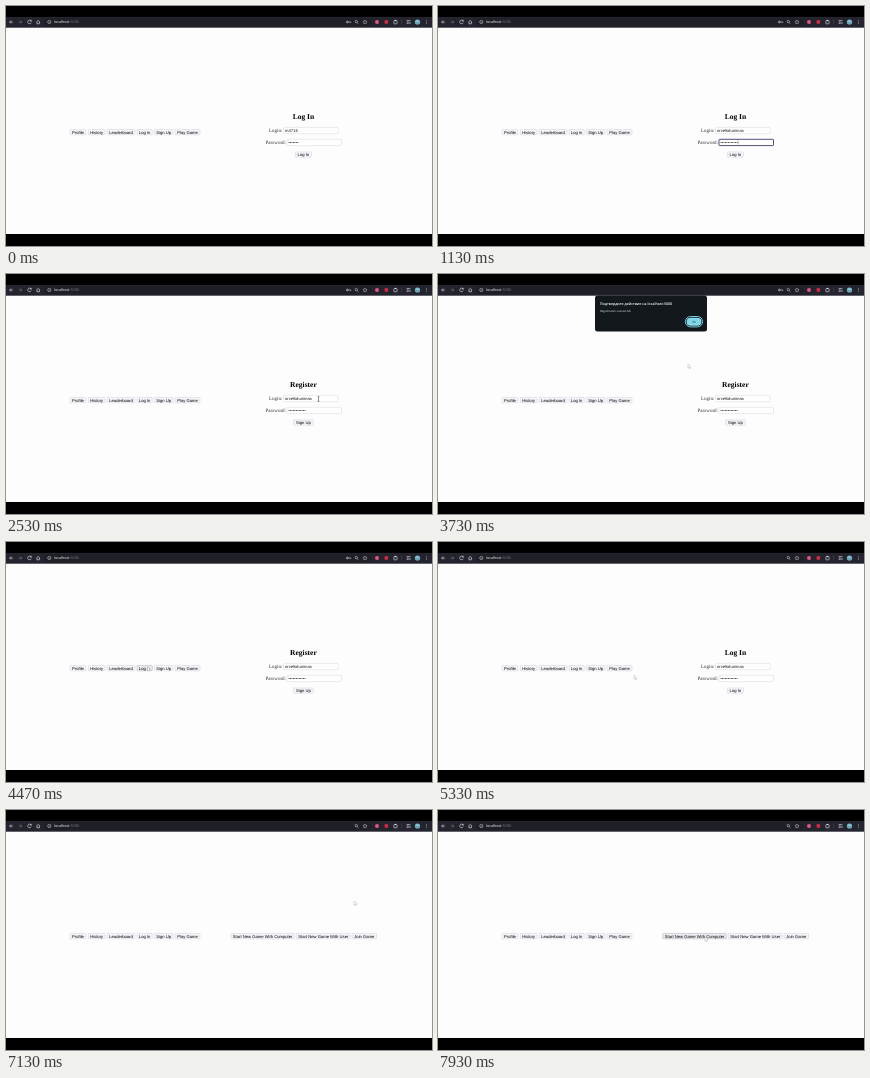
Animation, 426 px wide and 240 px high, one loop 8000 ms. Source, as an HTML page:

```html
<!DOCTYPE html>
<html lang="en">
<head>
<meta charset="utf-8">
<title>Sign-up walkthrough</title>
<style>
html, body { margin: 0; width: 100%; height: 100%; overflow: hidden; background: #000; }
svg { display: block; width: 100vw; height: 100vh; text-rendering: geometricPrecision; }
.ui { font-family: "Liberation Sans", Arial, sans-serif; }
.page { font-family: "Liberation Serif", "Times New Roman", serif; }
.chrome { font-family: "Open Sans", "Noto Sans", sans-serif; }
</style>
</head>
<body>
<svg id="stage" viewBox="0 0 426 240"></svg>
<script>
const LOOP = 8000;
const stage = document.getElementById('stage');
const SHORT_NAME = 'm4716';
const NAME = 'orvelkdunimas';

// Scene changes, in ms
const T = {
  clear: 170, nameStart: 220, nameEnd: 760, passStart: 820, passEnd: 1100,
  register: 1830, alertOn: 3330, alertOff: 4130,
  login: 4580, game: 5600, popupOn: 5730, popupOff: 7130
};

// Pointer stops: time, x, y
const STOPS = [
  [0, 304, 137], [1250, 304, 137], [1780, 158, 127], [1950, 158, 127],
  [2450, 312.5, 125], [2750, 312.5, 125], [3150, 298, 149], [3480, 298, 149],
  [3730, 250, 91], [4000, 256, 48], [4160, 256, 48], [4500, 139, 127],
  [4650, 139, 127], [4930, 298, 149], [5070, 298, 149], [5330, 196, 134],
  [5500, 188, 127], [6650, 188, 127], [7000, 348, 92], [7180, 348, 92],
  [7700, 267, 128], [8000, 267, 128]
];

const NAV = [['Profile', 64, 80], ['History', 82.3, 99], ['Leaderboard', 101, 129],
  ['Log In', 131, 146.3], ['Sign Up', 148.3, 167], ['Play Game', 169, 194]];
const GAME = [['Start New Game With Computer', 224.8, 288.4],
  ['Start New Game With User', 290.3, 344.3], ['Join Game', 346.2, 370.5]];

const clamp = v => Math.max(0, Math.min(1, v));
const within = (t, a, b) => t >= a && t < b;
const progress = (t, a, b) => clamp((t - a) / (b - a));

const rect = (x, y, w, h, fill, extra = '') =>
  `<rect x="${x}" y="${y}" width="${w}" height="${h}" fill="${fill}" ${extra}/>`;
const circle = (x, y, r, fill, extra = '') =>
  `<circle cx="${x}" cy="${y}" r="${r}" fill="${fill}" ${extra}/>`;
const path = (d, color, width = .6, extra = '') =>
  `<path d="${d}" fill="none" stroke="${color}" stroke-width="${width}" ${extra}/>`;
const text = (s, x, y, size, fill, cls = 'ui', extra = '') =>
  `<text x="${x}" y="${y}" font-size="${size}" fill="${fill}" class="${cls}" ${extra}>${s}</text>`;
const centered = 'text-anchor="middle"';

function pointerAt(t) {
  const i = Math.max(1, STOPS.findIndex(s => s[0] > t));
  const [a, x0, y0] = STOPS[i - 1], [b, x1, y1] = STOPS[i];
  const p = progress(t, a, b), k = p * p * (3 - 2 * p);
  return { x: x0 + (x1 - x0) * k, y: y0 + (y1 - y0) * k };
}

function button(label, left, right, pointer, top = 123.4) {
  const over = pointer.x >= left && pointer.x <= right && pointer.y >= top && pointer.y <= top + 6;
  return rect(left, top, right - left, 5.4, over ? '#ebebef' : '#f4f4f9',
    `rx=".7" stroke="${over ? '#8c8c98' : '#bdbbcb'}" stroke-width=".35"`) +
    text(label, (left + right) / 2, top + 4.2, 4.17, '#000', 'ui', centered);
}

function input(x, y, focused) {
  return rect(x, y, 54.5, 6.3, '#fff',
    `rx=".7" stroke="${focused ? '#2b2358' : '#c4c4cc'}" stroke-width="${focused ? .8 : .35}"`);
}

const bullets = (count, x, y, fill) =>
  Array.from({ length: count }, (_, i) => circle(x + i * 1.46, y, .52, fill)).join('');

function toolbar(keyShown, keyActive) {
  const c = '#e6e6ee';
  let s = rect(0, 11, 426, 10.7, '#24242e') + rect(38, 12.2, 327, 8, '#1f1f28', 'rx="4"');
  s += path('M7 16H3.6m1.5-1.5L3.6 16l1.5 1.5', c);
  s += path('M12.5 16h3.4m-1.5-1.5 1.5 1.5-1.5 1.5', '#77777e');
  s += path('M25 14.9a1.8 1.8 0 1 0 .2 1.8M25.3 13.8v1.4h-1.4', c);
  s += path('M30.4 16l1.8-1.6 1.8 1.6M31 15.8v2h2.4v-2', c);
  s += circle(43.3, 16, 1.6, 'none', `stroke="${c}" stroke-width=".5"`) + path('M43.3 15.7v1.2', c, .4);
  s += text('localhost<tspan fill="#85858c">:5000</tspan>', 48, 17.3, 3.7, '#fff', 'chrome');
  if (keyActive) s += circle(342.5, 16, 3.4, '#777a80');
  if (keyShown) s += circle(341.3, 16, .9, 'none', `stroke="${c}" stroke-width=".6"`) + path('M342.2 16h2.5v.9', c);
  s += circle(350.3, 15.6, 1.2, 'none', `stroke="${c}" stroke-width=".5"`) + path('M351.2 16.5l1.2 1.2', c);
  s += path('M359 14l.6 1.3 1.5.1-1.1 1 .3 1.4-1.3-.7-1.3.7.3-1.4-1.1-1 1.5-.1z', c, .4);
  s += circle(371, 16, 2, '#e45483') + rect(378.6, 14.2, 3.5, 3.5, '#d52643');
  s += rect(387.9, 14.6, 3.2, 3.2, 'none', `rx=".5" stroke="${c}" stroke-width=".6"`) + circle(389.4, 14.4, .7, c);
  s += path('M395.5 13.4v5', '#55565d', .4);
  s += path('M400.6 14.6h3.8M400.6 16h2.2M400.6 17.4h2.2', c) + circle(404, 16.9, .7, c);
  s += circle(411.5, 16, 2.6, '#83bfd3') + path('M409.5 16.5q2 1.6 4 0', '#42738b', .7);
  return s + [14.4, 16, 17.6].map(y => circle(420.5, y, .45, c)).join('');
}

function form(t, pointer) {
  const registering = within(t, T.register, T.login);
  const action = registering ? 'Sign Up' : 'Log In';
  const typed = Math.floor(progress(t, T.nameStart, T.nameEnd) * NAME.length);
  const name = t < T.clear ? SHORT_NAME : NAME.slice(0, typed);
  const dots = t < T.nameEnd ? 7 : Math.floor(progress(t, T.passStart, T.passEnd) * 12);
  const nameFocus = within(t, T.clear, T.nameEnd);
  const passFocus = within(t, T.nameEnd, 1700);
  let s = text(registering ? 'Register' : 'Log In', 297.4, 113.3, 7.5, '#000', 'page', centered + ' font-weight="bold"');
  s += text('Login:', 263, 126.2, 5, '#333', 'page') + input(277.5, 121.4, nameFocus);
  s += text(name, 279, 126, 4.17, '#1b1b1b');
  s += text('Password:', 259.4, 138.2, 5, '#333', 'page') + input(281, 133.3, passFocus);
  s += bullets(dots, 283, 136.5, '#252525');
  if (passFocus) s += path(`M${282.7 + dots * 1.46} 134.5v4`, '#222', .35);
  const half = registering ? 10 : 8;
  return s + button(action, 297.4 - half, 297.4 + half, pointer, 145.9);
}

function alertBox() {
  return rect(157, 21.5, 112, 36, '#12181c', 'rx="2.5"') +
    text('Подтвердите действие на localhost:5000', 162, 30.5, 3.55, '#fff', 'chrome', 'font-weight="600"') +
    text('Registration successful!', 162, 37.8, 2.85, '#f0f0f4', 'chrome') +
    rect(247.4, 42.5, 17.2, 10.4, 'none', 'rx="5.2" stroke="#78cde0" stroke-width="1"') +
    rect(248.6, 43.7, 14.8, 8, '#82d8e8', 'rx="4"') +
    text('ОК', 256, 48.8, 3, '#124153', 'chrome', centered);
}

function illustration() {
  const wheel = x => circle(x, 43.5, 3.4, 'none', 'stroke="#c1c9d6" stroke-width=".7"');
  let s = path('M295 40c-5-6 2-16 9-12s12-5 19 1M296 40c12 12 26 5 36 7s18 1 28 1', '#667994', .5, 'stroke-dasharray="1.5 1"');
  s += rect(302.5, 31, 26, 9, '#354a83', 'rx="3" stroke="#7289cb" stroke-width=".5"');
  for (let i = 0; i < 5; i++) s += circle(306.2 + i * 4.6, 35.5, 1.1, '#c4d6ff');
  s += circle(297, 26.5, 1, '#5487dd') + circle(335, 28, .8, '#dfc56a') + circle(326, 43, .9, '#56aa77') + circle(357, 28, .9, '#638ee1');
  s += wheel(342) + wheel(351.5);
  s += path('M342 43.5l3-5h5l1.5 5M345 38.5l2 5 3-5', '#73a2dd', .7);
  s += path('M346.5 30.5l-2.4 6 4 2-1 5', '#42b987', 2.2, 'stroke-linejoin="round"');
  s += path('M346.7 31.7l4 3.8', '#55cc9c', 1.4);
  return s + circle(347.7, 28.3, 1.7, '#77d9b2');
}

function passwordPopup() {
  const label = (s, y) => text(s, 289, y, 2.9, '#f0f2f6', 'chrome');
  const field = y => rect(319, y, 40.5, 9.8, '#10161a', 'rx="1.5" stroke="#414a55" stroke-width=".4"');
  const notes = ['Вы сможете использовать сохраненные пароли на',
    'любом устройстве. Они хранятся для аккаунта',
    'tamrelis@ulvera.test, <tspan fill="#83cdea" text-decoration="underline">Нолвик Менеджер паролей</tspan>'];
  let s = rect(284.5, 21.5, 80.5, 101.2, '#141a20', 'rx="3"');
  s += illustration();
  s += text('Отм', 289.3, 58, 2.8, '#8e939d', 'chrome');
  s += text('Сохранить пароль?', 300, 58.2, 3.75, '#fff', 'chrome', 'font-weight="600"');
  s += label('Имя пользователя', 67.5) + field(61.5) + text(NAME, 321.3, 67.4, 2.9, '#f0f2f6', 'chrome');
  s += label('Пароль', 79.2) + field(73.2) + bullets(14, 322, 78.2, '#c8cbd1');
  s += path('M351.2 78.2q2.2-2.5 4.4 0q-2.2 2.5-4.4 0', '#74bd8e', .5) + circle(353.4, 78.2, .7, '#74bd8e');
  s += rect(309, 87, 24.5, 9.4, '#82d6e8', 'rx="4.7"') + text('Сохранить', 321.2, 92.8, 3, '#173f51', 'chrome', centered);
  s += rect(336, 87, 23.2, 9.4, 'none', 'rx="4.7" stroke="#70818e" stroke-width=".5"') + text('Нет', 347.6, 92.8, 3, '#a8d8e8', 'chrome', centered);
  s += rect(284.5, 101, 80.5, .4, '#343a42');
  return s + notes.map((line, i) => text(line, 289, 107.3 + i * 5, 2.7, '#b8bec8', 'chrome')).join('');
}

function cursor(t, { x, y }) {
  if (t < 1250) return '';
  if (within(t, 2400, 2800)) return path(`M${x - 1} ${y - 2.3}h2m-1 0v4.6m-1 0h2`, '#333', .5);
  return `<path d="M${x} ${y - 1}v4.2l1-.9.7 1.5.7-.3-.7-1.5h1.3z" fill="#fff" stroke="#999" stroke-width=".35"/>`;
}

function draw(t) {
  const pointer = pointerAt(t);
  const popup = within(t, T.popupOn, T.popupOff);
  let s = rect(0, 0, 426, 240, '#000') + rect(0, 21, 426, 207, '#fdfdfe');
  s += NAV.map(b => button(...b, pointer)).join('');
  s += t < T.game ? form(t, pointer) : GAME.map(b => button(...b, pointer)).join('');
  s += toolbar(t < T.login || popup, popup);
  if (within(t, T.alertOn, T.alertOff)) s += alertBox();
  if (popup) s += passwordPopup();
  stage.innerHTML = s + cursor(t, pointer);
}

const start = performance.now();
function tick() {
  draw((performance.now() - start) % LOOP);
  requestAnimationFrame(tick);
}
tick();
</script>
</body>
</html>
```
